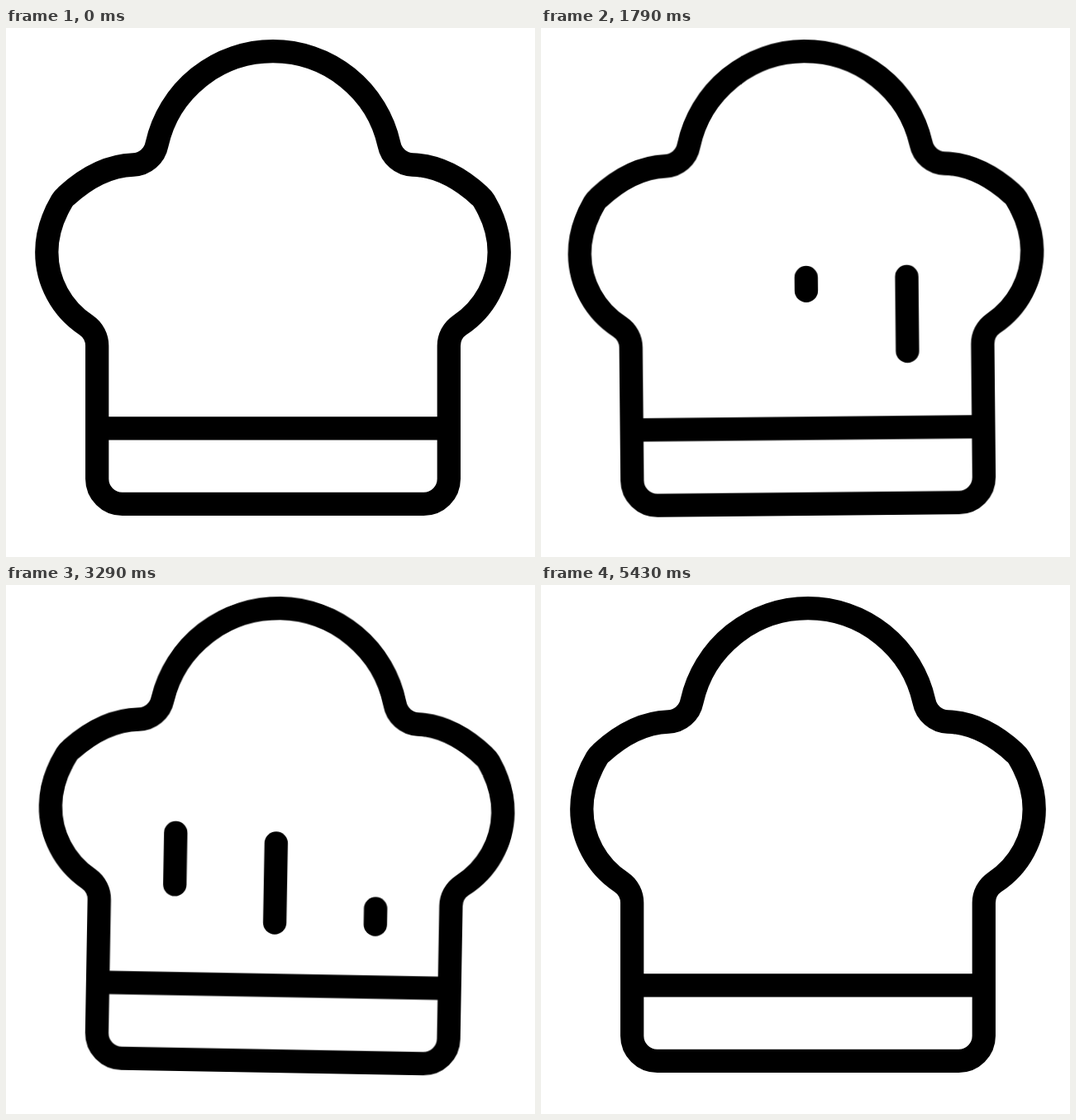
These frames come from a looping animation (640 px wide and 640 px high, 5.57 s). An HTML page:

```html
<!DOCTYPE html>
<html lang="en">
<head>
<meta charset="utf-8">
<title>Chef hat</title>
<style>
  html, body { margin: 0; width: 100%; height: 100%; overflow: hidden; background: #fff; }
  svg { display: block; width: 100%; height: 100%; }
  #hat {
    fill: none; stroke: #000; stroke-width: 28.3;
    transform-origin: 323px 530px;
    animation: sway 5428.57ms infinite paused;
    animation-delay: calc(var(--t, 0) * -1ms);
  }
  .steam { stroke-linecap: round; }
  @keyframes sway {
    0%   { transform: rotate(0deg);  animation-timing-function: cubic-bezier(.35, .45, .6, 1); }
    25%  { transform: rotate(-5deg); animation-timing-function: cubic-bezier(.35, .45, .6, 1); }
    50%  { transform: rotate(5deg);  animation-timing-function: cubic-bezier(.3, .5, .65, .85); }
    75%  { transform: rotate(-2deg); animation-timing-function: cubic-bezier(.25, .42, .6, 1); }
    100% { transform: rotate(0deg); }
  }
</style>
</head>
<body>
<svg viewBox="0 0 640 640">
  <g id="hat">
    <path d="M110.2 385 A30.4 30.4 0 0 0 97 359.5
      A105.5 105.5 0 0 1 49.3 271
      C49.3 249 56 229 67.5 209.5 Q70 205.5 73 203
      C96 182 124 166.5 154 165.5
      A30.4 30.4 0 0 0 182.5 141
      A143.9 143.9 0 0 1 463.5 141
      A30.4 30.4 0 0 0 492 165.5
      C522 166.5 550 182 573 203 Q576 205.5 578.5 209.5
      C590 229 596.7 249 596.7 271
      A105.5 105.5 0 0 1 549 359.5
      A30.4 30.4 0 0 0 535.8 385
      V545.5 A30.4 30.4 0 0 1 505.4 575.8
      H140.6 A30.4 30.4 0 0 1 110.2 545.5 Z"/>
    <path d="M110.2 484.3 H535.8"/>
    <line class="steam" x1="201.3" x2="201.3"/>
    <line class="steam" x1="323" x2="323"/>
    <line class="steam" x1="444.7" x2="444.7"/>
  </g>
</svg>
<script>
  const LOOP = 5570, STEP = 1000 / 14, LAST = 76;
  const TOP = 302, BOTTOM = 408.5, RISE = 8.1, REPEAT = 32;
  // steps at which each line starts to grow and starts to shrink
  const timing = [[0.45, 10.65], [6.7, 18.1], [12.55, 23.75]];
  const hat = document.getElementById('hat');
  const lines = [...document.querySelectorAll('.steam')];
  const clamp = v => Math.min(1, Math.max(0, v));

  function drawLine(line, step, [grow, shrink]) {
    // the second puff begins when this line is due again
    const p = step >= REPEAT + grow ? step - REPEAT : step;
    const y = part => BOTTOM + (TOP - BOTTOM) * part;
    const head = clamp((p - grow) / RISE);
    const tail = clamp((p - shrink) / RISE);
    line.setAttribute('y1', y(tail));
    line.setAttribute('y2', y(head));
    line.style.display = head > tail ? '' : 'none';
  }

  function draw(now) {
    const step = Math.min(LAST, Math.floor((now % LOOP + 5) / STEP));
    hat.style.setProperty('--t', step === LAST ? 0 : step * STEP);
    lines.forEach((line, i) => drawLine(line, step, timing[i]));
  }

  const start = performance.now();
  function tick() {
    draw(performance.now() - start);
    requestAnimationFrame(tick);
  }
  tick();
</script>
</body>
</html>
```
